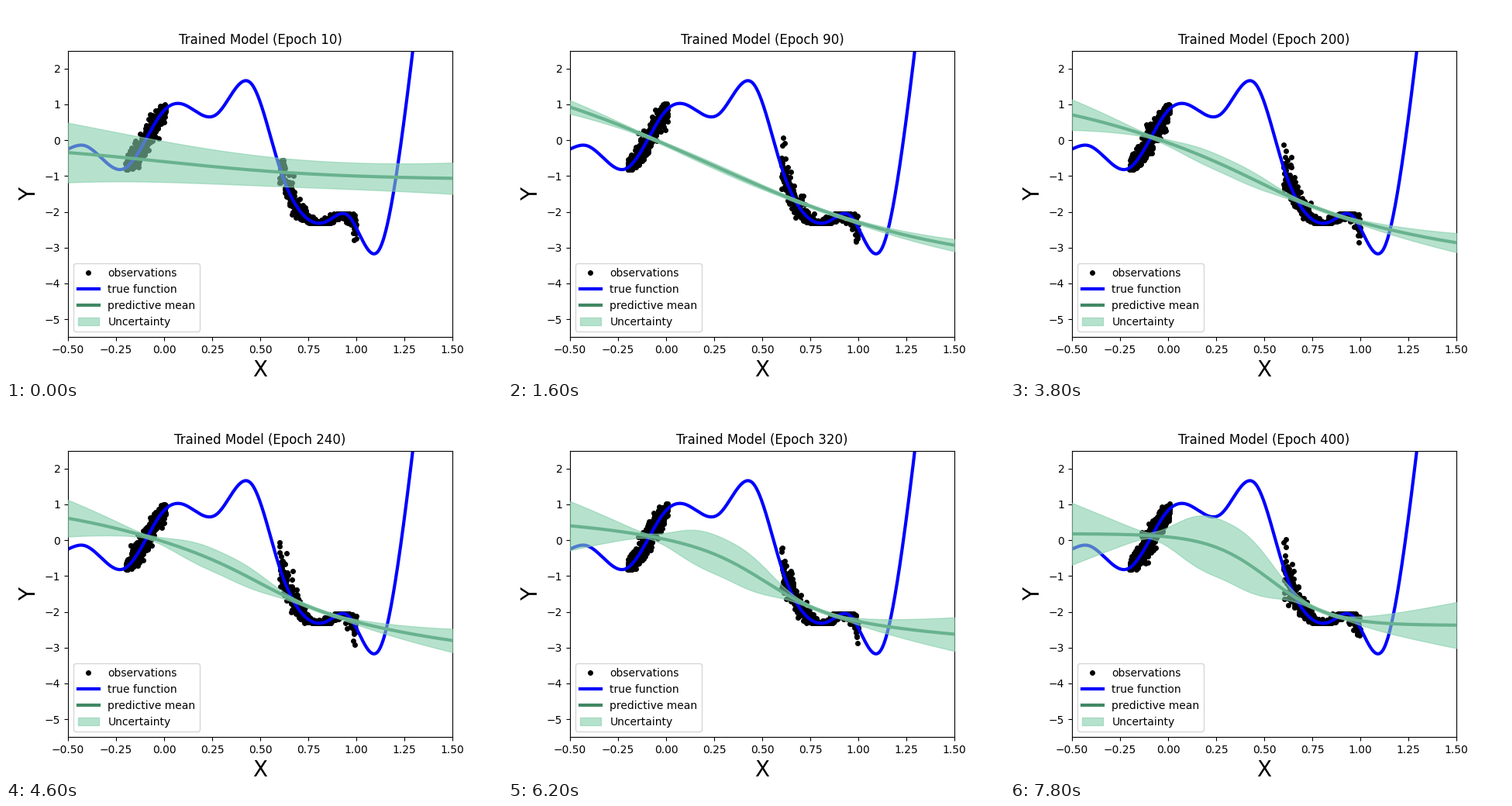
A matplotlib script for the animation above (8000 ms loop, 640 by 480 pixels).

```python
import numpy as np
import matplotlib.pyplot as plt
from matplotlib.animation import FuncAnimation

FRAMES, STEP_MS = 40, 200
NOISE = 0.02
GREEN, MINT = "#408765", "#86cfac"

# Turning points of the true function, plus a few on its steep flanks.
KEYS = [(-.5, -.25), (-.415, -.15), (-.21, -.8), (0, .83), (.1, 1),
        (.275, .73), (.455, 1.57), (.6, -.75), (.7, -1.93), (.85, -2.26),
        (.96, -2.12), (1.12, -3.05), (1.22, -.55), (1.34, 4.6)]


def spline(points, x):
    """Natural cubic spline through the points, evaluated at x."""
    xk, yk = np.array(points, float).T
    h = np.diff(xk)
    slope = np.diff(yk) / h
    a, rhs = np.eye(len(xk)), np.zeros(len(xk))
    for i in range(1, len(xk) - 1):
        a[i, i - 1:i + 2] = h[i - 1], 2 * (h[i - 1] + h[i]), h[i]
        rhs[i] = 6 * (slope[i] - slope[i - 1])
    m = np.linalg.solve(a, rhs)
    i = np.clip(np.searchsorted(xk, x) - 1, 0, len(h) - 1)
    p, q = xk[i + 1] - x, x - xk[i]
    return ((m[i] * p**3 + m[i + 1] * q**3) / (6 * h[i])
            + (yk[i] / h[i] - m[i] * h[i] / 6) * p
            + (yk[i + 1] / h[i] - m[i + 1] * h[i] / 6) * q)


def truth(x):
    return spline(KEYS, x)


def lerp(a, b, w):
    return a + (b - a) * w


def fall(x, mid, drop, center, scale):
    return mid - drop * np.tanh((x - center) / scale)


def predict(x, epoch):
    """Predictive mean and half-width of the band."""
    fit = (1 - np.exp(-(epoch - 10) / 16)) / (1 - np.exp(-5))
    fit = min(fit, 1)                    # quick first fit
    t = max(epoch - 90, 0) / 310         # slow bending afterwards
    grow = t ** 1.5

    start = fall(x, -.6, .5, 0, .9)
    early = fall(x, -.6, 3, .2, 1.25)
    late = fall(x, -1.1, 1.28, .53, .32)
    mean = lerp(start, lerp(early, late, t ** (1.4 + .4 * x)), fit)

    # The band is wide away from the data and pinched where data lies.
    left = (.18 + .68 * t) * np.maximum(-.1 - x, 0) / .4
    gap = (.06 + .76 * grow) * np.exp(-np.abs((x - .3) / .29) ** 3)
    right = (.16 + .48 * grow) * np.maximum(x - .9, 0) / .6
    pinched = np.hypot(left + gap + right, .05)
    width = lerp(.37 + .22 * (x - .95) ** 2, pinched, fit)
    return mean, width


grid = np.linspace(-.5, 1.5, 300)
x_true = np.linspace(-.5, 1.34, 900)
x_obs = np.hstack([np.linspace(-.2, .008, 500), np.linspace(.6, 1, 500)])

fig, ax = plt.subplots(figsize=(6.4, 4.8), dpi=100)
dots, = ax.plot(x_obs, truth(x_obs), "ko", markersize=4, label="observations")
ax.plot(x_true, truth(x_true), "b-", linewidth=3, label="true function")
mean_line, = ax.plot(grid, 0 * grid, color=GREEN, linewidth=3,
                     label="predictive mean")
band = ax.fill_between(grid, 0 * grid, color=MINT, alpha=.6, zorder=5,
                       label="Uncertainty")
ax.set_xlim(-.5, 1.5)
ax.set_ylim(-5.5, 2.5)
ax.set_xlabel("X", fontsize=20)
ax.set_ylabel("Y", fontsize=20)
ax.legend(loc="lower left")
title = ax.set_title("")


def update(i):
    epoch = 10 * (i + 1)
    rng = np.random.RandomState(epoch)
    dots.set_ydata(truth(x_obs + NOISE * rng.randn(len(x_obs))))
    mean, width = predict(grid, epoch)
    mean_line.set_ydata(mean)
    top = np.column_stack([grid, mean + width])
    bottom = np.column_stack([grid, mean - width])
    band.set_verts([np.vstack([top, bottom[::-1]])])
    title.set_text(f"Trained Model (Epoch {epoch})")
    return dots, mean_line, band, title


anim = FuncAnimation(fig, update, frames=FRAMES, interval=STEP_MS,
                     repeat=True, repeat_delay=0)
plt.show()
```
